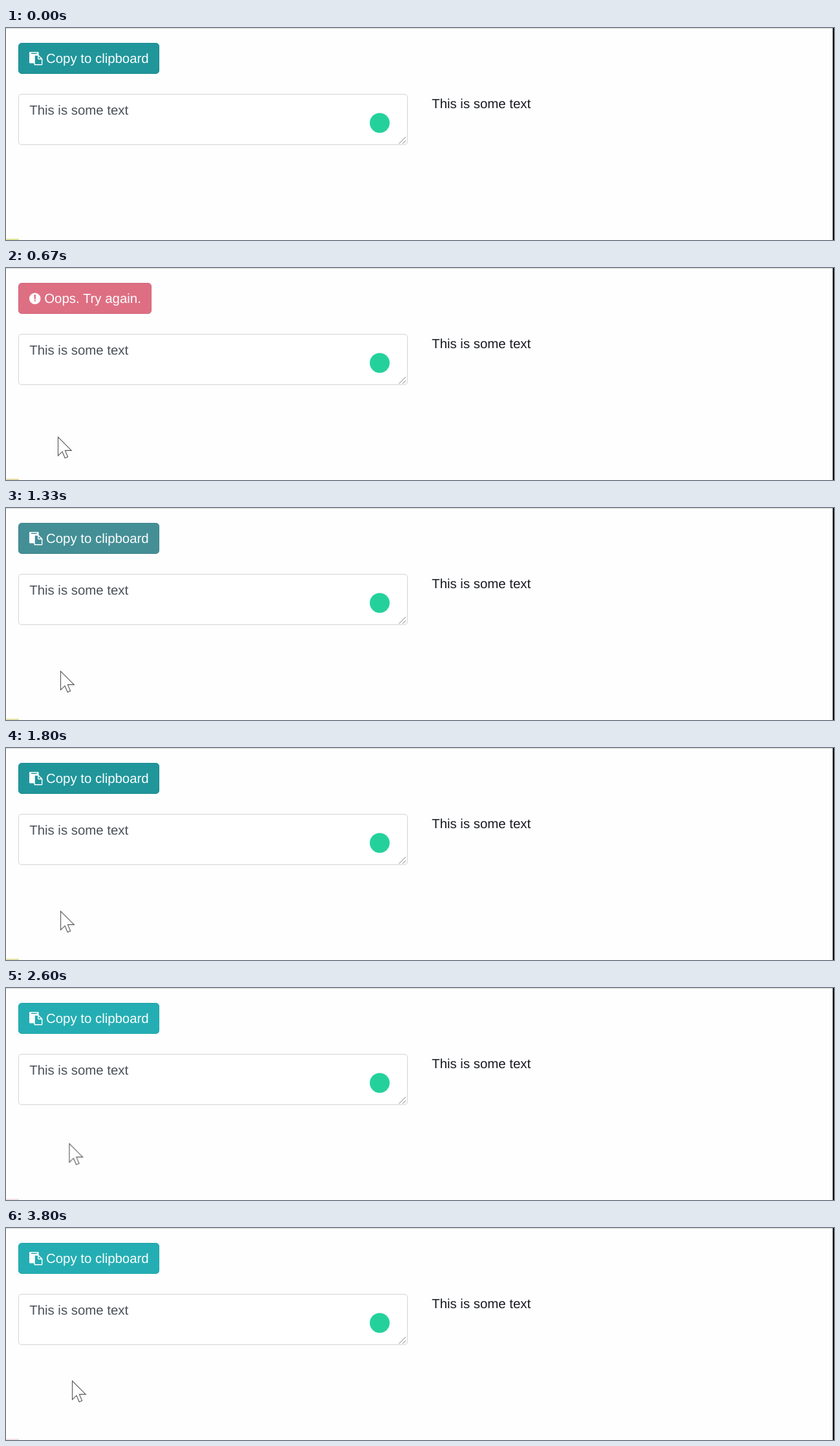
An HTML page for the animation above (3.83 s loop, 1280 by 328 pixels).

```html
<!DOCTYPE html>
<html lang="en">
<head>
<meta charset="utf-8">
<title>Copy to clipboard</title>
<style>
  html, body { margin: 0; width: 100%; height: 100%; overflow: hidden; background: #fefefe; }
  svg { display: block; }
  text { font: 20.4px "Liberation Sans", Arial, sans-serif; text-rendering: geometricPrecision; }
  .label, .icon { fill: #fff; stroke: none; }
</style>
</head>
<body>
<svg width="1280" height="328" viewBox="0 0 1280 328">
  <rect width="1280" height="328" fill="#fefefe"/>
  <rect width="1278" height="1" fill="#d2d2d2"/>
  <rect id="strip" y="326" width="20" height="2" fill="#e6e6a0"/>

  <g id="button" fill="#20969b" stroke="#1e8a8f">
    <g id="copy">
      <rect x="19.5" y="23.5" width="217" height="47" rx="4.6"/>
      <path class="icon" fill-rule="evenodd" transform="translate(36 37) scale(.01138)"
        d="M96 0H1184Q1280 0 1280 96V424L1316 452L1724 860Q1792 940 1792 1024V1696Q1792 1792 1696 1792H736Q640 1792 640 1696V1536H96Q0 1536 0 1440V96Q0 0 96 0Z
           M768 1664H1664V1024H1248Q1152 1024 1152 928V512H768Z
           M288 128Q256 128 256 160V224Q256 256 288 256H992Q1024 256 1024 224V160Q1024 128 992 128Z
           M1280 896H1579L1280 597Z"/>
      <text class="label" x="62" y="54.4">Copy to clipboard</text>
    </g>
    <g id="oops">
      <rect x="19.5" y="23.5" width="205" height="47" rx="4.6"/>
      <path class="icon" fill-rule="evenodd" transform="translate(36 37) scale(.01138)"
        d="M0 896A768 768 0 0 1 1536 896A768 768 0 0 1 0 896Z
           M654 384H882L862 1010H674Z M672 1088H864V1280H672Z"/>
      <text class="label" x="59.2" y="54.4">Oops. Try again.</text>
    </g>
  </g>

  <rect x="19.5" y="102.5" width="601" height="78" rx="4.6" fill="#fff" stroke="#d0d4d8"/>
  <text x="36.2" y="133.6" fill="#495057">This is some text</text>
  <path d="M607.5 179L618 168.5M613 179L618 174" stroke="#777" fill="none"/>
  <circle cx="577.7" cy="146.8" r="15.4" fill="#25d19b"/>
  <text x="658.2" y="124.2" fill="#181b20">This is some text</text>

  <g id="cursor">
    <path d="M.5 .5V29.5L7 23.2L11.2 33L15.6 31.2L11.4 21.4H21.2Z" fill="#fff" stroke="#555" stroke-width="1.1"/>
  </g>
  <rect x="1278" width="2" height="328" fill="#000"/>
</svg>
<script>
const LOOP = 3830;

// rows: [ms, value, easing to the next row]
function play(id, prop, rows, easing = "linear") {
  const frames = rows.map(([ms, value, ease]) => ({
    offset: ms / LOOP, [prop]: value, easing: ease || easing
  }));
  frames.push({ offset: 1, [prop]: rows[rows.length - 1][1] });
  document.getElementById(id).animate(frames, { duration: LOOP, iterations: Infinity });
}

const FAIL = 70, RESET = 1255, BLUR = 1800, FADE = 150;

function fades(focus, fail, idle) {
  return [
    [0, focus], [FAIL, focus, "ease"], [FAIL + FADE, fail],
    [RESET, fail, "ease"], [RESET + FADE, focus],
    [BLUR, focus, "ease"], [BLUR + FADE, idle]
  ];
}

play("button", "fill", fades("#20969b", "#de6f83", "#24aeb3"));
play("button", "stroke", fades("#1e8a8f", "#d0687b", "#22a6ab"));

const hard = "steps(1, end)";
play("copy", "opacity", [[0, 1], [FAIL, 0], [RESET, 1]], hard);
play("oops", "opacity", [[0, 0], [FAIL, 1], [RESET, 0]], hard);
play("strip", "fill", [
  [0, "#e0e69c"], [100, "#fbf7cf"], [600, "#e9dcaa"],
  [1130, "#e6e3a3"], [2330, "#f3e1e5"]
], hard);

const path = [
  [0, 90, 340], [70, 90, 328], [230, 87, 273], [530, 81, 263], [600, 81, 263],
  [670, 80, 261], [800, 80, 261], [1100, 83, 254], [1130, 83, 254],
  [1330, 84, 252], [1800, 84, 252], [2270, 90, 247], [2330, 90, 247], [2770, 102, 236]
];
play("cursor", "transform", path.map(([ms, x, y]) => [ms, `translate(${x}px, ${y}px)`, ms ? "" : hard]));
</script>
</body>
</html>
```
